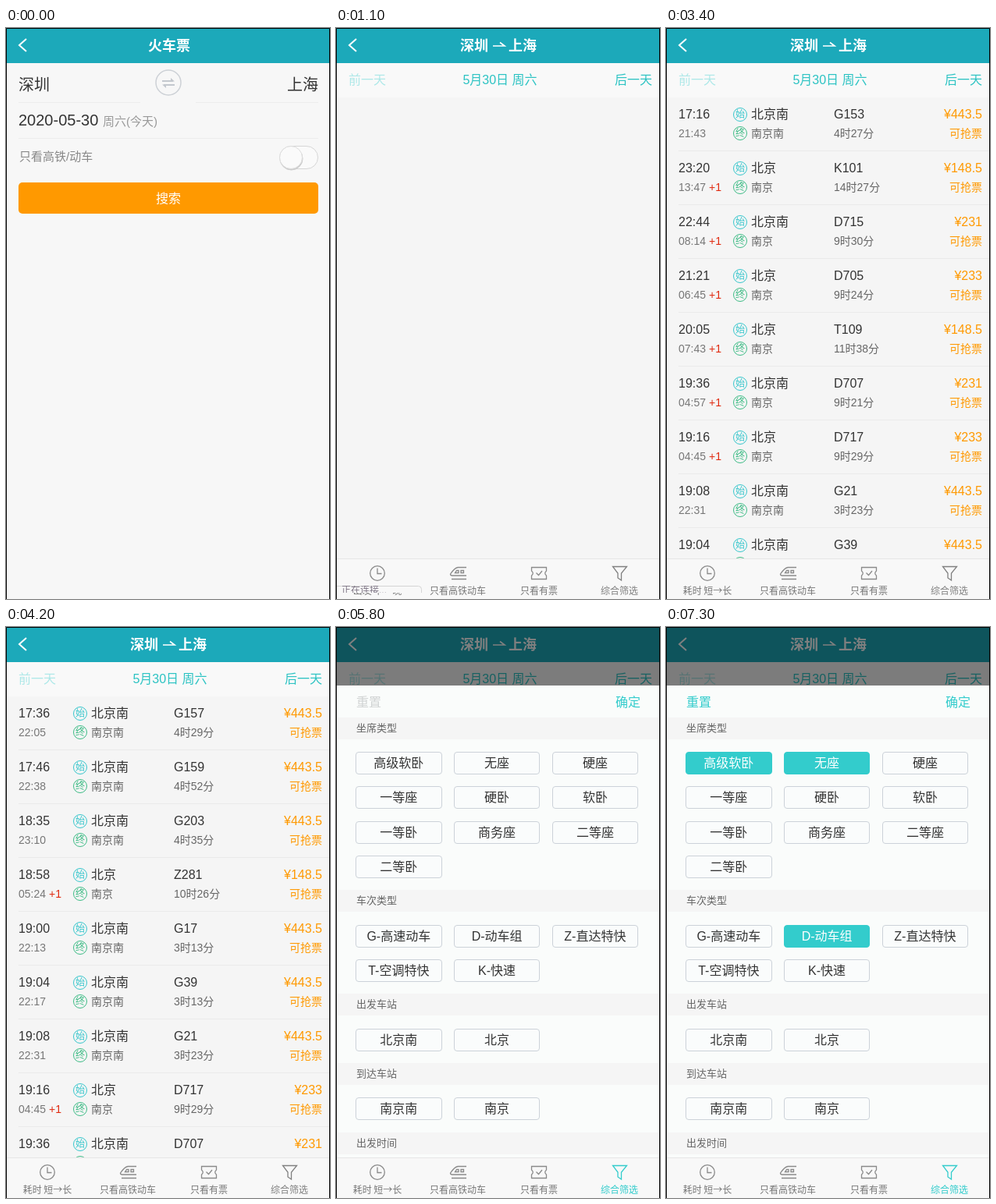
An HTML page for the animation above (8 s loop, 415 px wide and 732 px high).

```html
<!DOCTYPE html>
<html lang="zh-CN">
<head>
<meta charset="utf-8">
<title>火车票</title>
<style>
html, body { margin: 0; width: 100%; height: 100%; overflow: hidden; background: #f7f7f7; }
svg { display: block; width: 415px; height: 732px; font: 300 16px "Liberation Sans", "Noto Sans CJK SC", "Noto Sans CJK", sans-serif; }
text { white-space: pre; }
.tabs text { font-family: "Noto Sans CJK SC", "Noto Sans CJK", sans-serif; }
</style>
</head>
<body>
<svg id="stage" viewBox="0 0 415 732"></svg>
<script>
const LOOP = 8000;
const TEAL = '#3cc', ORANGE = '#f90', DARK = '#333', GREY = '#777';

// Text placed by its vertical centre, with the baseline on a whole pixel.
const text = (x, cy, str, size = 16, fill = DARK, anchor = 'start', extra = '') =>
  `<text x="${x}" y="${Math.round(cy + size * 0.37)}" font-size="${size}" fill="${fill}" text-anchor="${anchor}" ${extra}>${str}</text>`;
const mid = (x, cy, str, size, fill) => text(x, cy, str, size, fill, 'middle');
const end = (x, cy, str, size, fill) => text(x, cy, str, size, fill, 'end');
const bold = (x, str) => text(x, 22, str, 18, '#fff', 'start', 'font-weight="700"');
const rect = (x, y, w, h, fill, extra = '') =>
  `<rect x="${x}" y="${y}" width="${w}" height="${h}" fill="${fill}" ${extra}/>`;
const line = (d, stroke, width = 1) =>
  `<path d="${d}" fill="none" stroke="${stroke}" stroke-width="${width}"/>`;
const ring = (x, y, r, stroke, fill = 'none', width = 1) =>
  `<circle cx="${x}" cy="${y}" r="${r}" fill="${fill}" stroke="${stroke}" stroke-width="${width}"/>`;
// Content visible only while from <= time < to.
const during = (from, to, ...parts) =>
  `<g class="timed" data-from="${from}" data-to="${to}">${parts.join('')}</g>`;

const header = rect(0, 0, 415, 45, '#1ca9ba') + line('M26 14L17 22L26 30', '#fff', 2);

const button = fill => rect(16, 198, 384, 40, fill, 'rx="5"') + mid(208, 218, '搜索', 16, '#fff');
const searchPage = during(0, 1100,
  bold(182, '火车票'),
  text(16, 73, '深圳', 20), end(400, 73, '上海', 20),
  line('M16 95.5H172M243 95.5H400M16 141.5H400', '#ededed'),
  ring(208, 70, 16, '#cdd1d6', 'none', 1.5),
  line('M200 68H214M202 73H216', '#c3c8ce', 1.8),
  '<path d="M211 64l5 4.5h-5zM205 77l-5-4.5h5z" fill="#c3c8ce"/>',
  text(16, 118, '2020-05-30', 20), text(124, 119, '周六(今天)', 15, '#999'),
  text(17, 164, '只看高铁/动车', 15, '#888'),
  rect(350.5, 151.5, 49, 29, '#fafafa', 'rx="14.5" stroke="#d6d6d6"'),
  ring(365.5, 167.5, 14.5, '#ccc', '#ccc'), ring(365, 166, 14.5, '#ddd', '#fafafa'),
  during(0, 800, button(ORANGE)),
  during(800, 1100, button('#ee8f00')));

const resultPage = during(1100, LOOP,
  bold(159, '深圳'), bold(221, '上海'),
  line('M201 23H216L210 18.5', '#fff', 1.6),
  rect(0, 45, 415, 44, '#f9f9f9'), rect(0, 89, 415, 591, '#f5f5f5'),
  text(16, 66, '前一天', 16, '#ade8e8'),
  mid(210, 66, '5月30日 周六', 16, '#2cc3c3'),
  end(405, 66, '后一天', 16, '#2cc3c3'));

const badge = (cy, label, color) => ring(95, cy, 8.5, color) + mid(95, cy, label, 12, color);
function trainRow(entry, i) {
  const [depart, arrive, train, duration, price] = entry.split(' ');
  const y = 110 + 69 * i;
  return text(16, y, depart) + text(16, y + 25, arrive, 14, GREY) +
    (arrive < depart ? text(55, y + 25, '+1', 14, '#e02a10') : '') +
    badge(y + 1, '始', '#36c6cc') + badge(y + 25, '终', '#3dbb85') +
    text(109, y, /G|D715|D707/.test(train) ? '北京南' : '北京') +
    text(109, y + 25, train[0] === 'G' ? '南京南' : '南京', 14, '#666') +
    text(215, y, train) + text(215, y + 25, duration, 14, '#666') +
    end(405, y, '¥' + price, 16, ORANGE) + end(405, y + 25, '可抢票', 14, ORANGE) +
    line(`M16 ${y + 47.5}H414`, '#eaeaea');
}
const G39 = '19:04 22:17 G39 3时13分 443.5';
const G21 = '19:08 22:31 G21 3时23分 443.5';
const D717 = '19:16 04:45 D717 9时29分 233';
const D707 = '19:36 04:57 D707 9时21分 231';
const firstList = [
  '17:16 21:43 G153 4时27分 443.5', '23:20 13:47 K101 14时27分 148.5',
  '22:44 08:14 D715 9时30分 231', '21:21 06:45 D705 9时24分 233',
  '20:05 07:43 T109 11时38分 148.5', D707, D717, G21, G39];
const secondList = [
  '17:36 22:05 G157 4时29分 443.5', '17:46 22:38 G159 4时52分 443.5',
  '18:35 23:10 G203 4时35分 443.5', '18:58 05:24 Z281 10时26分 148.5',
  '19:00 22:13 G17 3时13分 443.5', G39, G21, D717, D707];
const lists =
  during(1900, 4200, ...firstList.map(trainRow)) +
  during(4200, LOOP, ...secondList.map(trainRow));

function chip(label, col, y, pickedAt = LOOP) {
  const left = 25 + 125.8 * col;
  const x = Math.round(left), width = Math.round(left + 110.6) - x;
  const draw = (fill, stroke, color) =>
    rect(x + .5, y + .5, width - 1, 28, fill, `rx="3.5" stroke="${stroke}"`) +
    mid(left + 55.3, y + 14.5, label, 16, color);
  return during(0, pickedAt, draw('#fafcfc', '#ccd2d9', DARK)) +
    during(pickedAt, LOOP, draw(TEAL, TEAL, '#fff'));
}
const picks = { 无座: 6200, 高级软卧: 6700, 'D-动车组': 7300 };
const section = (y, title, ...labels) =>
  rect(1, Math.floor(y), 413, 28, '#f5f5f5') + text(26, y + 12.7, title, 13, '#666') +
  labels.map((label, i) =>
    chip(label, i % 3, Math.round(y + 44 + 44.4 * Math.floor(i / 3)), picks[label])).join('');
const filterPanel = during(5300, LOOP,
  rect(0, 0, 415, 75, '#000', 'opacity=".5"'),
  rect(0, 75, 415, 605, '#fafcfb'),
  during(0, 6200, text(26, 96, '重置', 16, '#d0d3d3')),
  during(6200, LOOP, text(26, 96, '重置', 16, TEAL)),
  end(390, 96, '确定', 16, TEAL),
  section(116, '坐席类型', '高级软卧', '无座', '硬座', '一等座', '硬卧', '软卧', '一等卧', '商务座', '二等座', '二等卧'),
  section(337.5, '车次类型', 'G-高速动车', 'D-动车组', 'Z-直达特快', 'T-空调特快', 'K-快速'),
  section(470.5, '出发车站', '北京南', '北京'),
  section(559, '到达车站', '南京南', '南京'),
  section(648, '出发时间'),
  rect(408, 118, 3, 419, '#bfc1c1', 'rx="1.5" id="scrollbar"'));

const icon = (d, color = '#8a8a8a') => line(d, color, 1.3);
const filterTab = color =>
  icon('M354.5 690.5H372.5L365.5 699V708L361 705V699Z', color) + mid(363, 722, '综合筛选', 12, color);
const footer = `<g class="tabs">${during(1100, LOOP,
  rect(0, 680, 415, 52, '#f8f8f8'), line('M0 680.5H415', '#e6e6e6'),
  ring(53, 699, 9.3, '#8a8a8a', 'none', 1.3), icon('M53 692.5V699.5H58.5'),
  during(0, 3400, mid(53, 722, '出发 早→晚', 12, GREY)),
  during(3400, LOOP, mid(53, 722, '耗时 短→长', 12, GREY)),
  icon('M167 691.5H156Q152 692 146.5 700Q146.5 702 149 702H167M148 706.5H167M152.5 698.5L154.5 695.5H157V698.5ZM160 695.5H163.5V698.5H160Z'),
  mid(156, 722, '只看高铁动车', 12, GREY),
  icon('M250.5 691.5H269.5V696Q266 699 269.5 702V706.5H250.5V702Q254 699 250.5 696ZM256.5 698.5L259.5 701.5L264 696'),
  mid(260, 722, '只看有票', 12, GREY),
  during(0, 5300, filterTab('#808080')),
  during(5300, LOOP, filterTab(TEAL)))}</g>`;

const bubble = `<clipPath id="strip"><path d="M0 715H111V724H0Z"/></clipPath>
  <g id="bubble" clip-path="url(#strip)">
    ${rect(-5, 715.5, 114.5, 20, '#f8f8f8', 'rx="4" stroke="#d4d4d4"')}
    ${text(7, 721, '正在连接...', 12, '#7d7484')}
  </g>`;

const stage = document.getElementById('stage');
stage.innerHTML = rect(0, 0, 415, 732, '#f7f7f7') + header + searchPage + resultPage + lists +
  filterPanel + footer + bubble + line('M.5 732V.5H414.5V732', '#000');

const timed = [...stage.querySelectorAll('.timed')].map(node =>
  ({ node, from: +node.dataset.from, to: +node.dataset.to }));
const scrollbar = document.getElementById('scrollbar');
const bubbleNode = document.getElementById('bubble');

// Fades out in equal hard steps of 100 ms.
const stepFade = (t, start, steps) =>
  Math.min(1, Math.max(0, 1 - Math.floor((t - start + 100) / 100) / steps));

function render(now) {
  const t = now % LOOP;
  for (const { node, from, to } of timed) {
    node.style.display = t >= from && t < to ? '' : 'none';
  }
  scrollbar.style.opacity = stepFade(t, 5600, 3);
  bubbleNode.style.opacity = t < 900 ? 0 : stepFade(t, 1500, 2);
}

const start = performance.now();
function tick() {
  render(performance.now() - start);
  requestAnimationFrame(tick);
}
tick();
</script>
</body>
</html>
```
